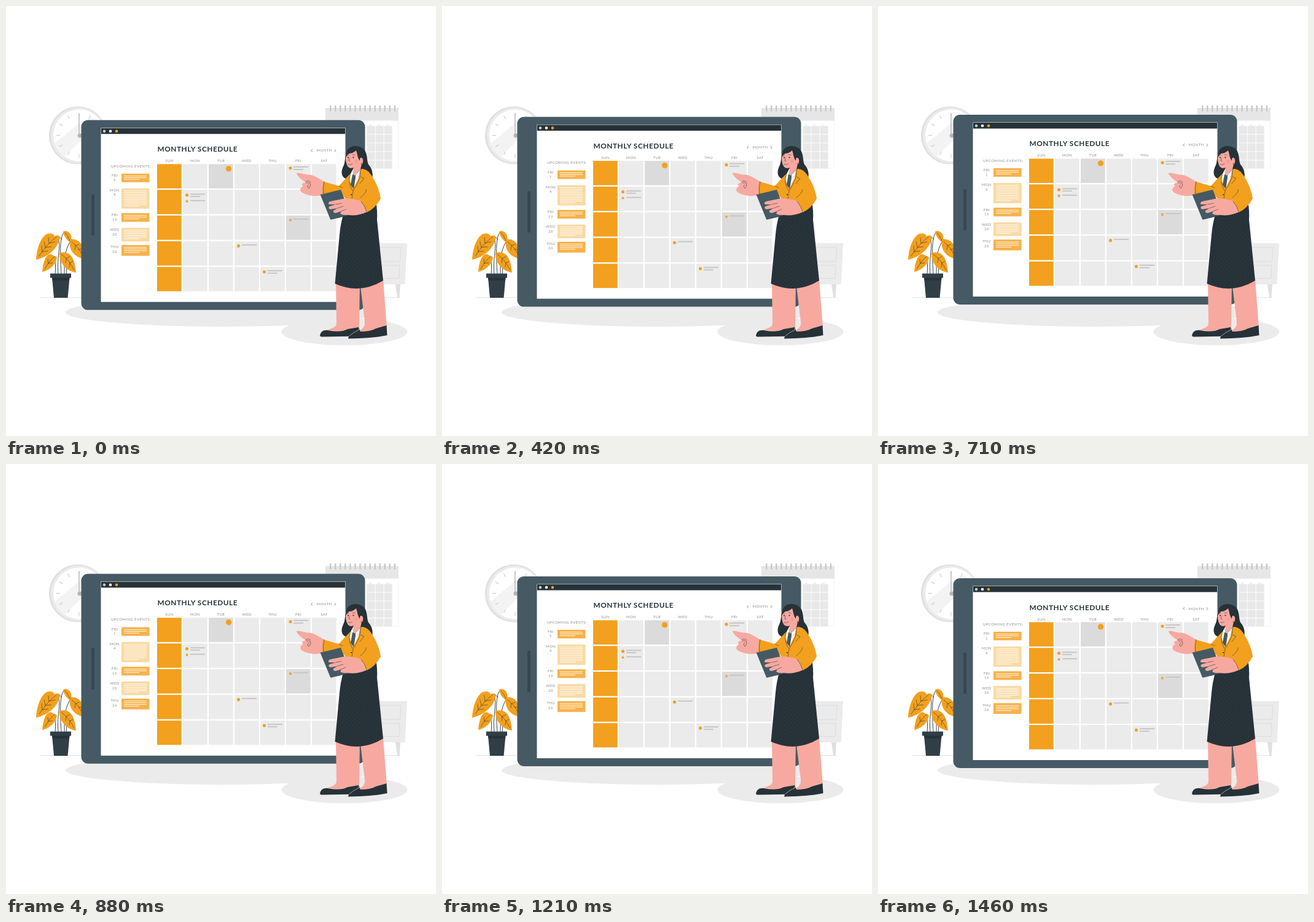
Recreate the animation shown at these times as an HTML page. Size 700x700 px, loop 1500 ms.

```html
<!DOCTYPE html>
<html lang="en">
<head>
<meta charset="utf-8">
<title>Monthly schedule</title>
<style>
  html, body { margin: 0; width: 100%; height: 100%; overflow: hidden; background: #fff; }
  svg { display: block; width: 100vw; height: 100vh; }
  text { font-family: Lato, sans-serif; }
  .title { font-size: 11.8px; font-weight: 700; fill: #263238; letter-spacing: .55px; }
  .label { font-size: 6px; fill: #8c8c8c; letter-spacing: .4px; }
  .ink { fill: none; stroke: #263238; stroke-width: .9; stroke-linecap: round; stroke-linejoin: round; }
  .thin { stroke-width: .55; }
</style>
</head>
<body>
<svg viewBox="0 0 700 700">
  <defs>
    <pattern id="weave" width="7" height="7" patternUnits="userSpaceOnUse">
      <rect width="7" height="7" fill="#263238"/>
      <path d="M1 2h.8M4.500 5.500h.8" stroke="#3f5059" stroke-width=".8"/>
    </pattern>
  </defs>

  <path d="M56 474.700H642" stroke="#e0e0e0"/>
  <ellipse cx="350" cy="498.500" rx="253" ry="23.500" fill="#ebebeb"/>
  <ellipse cx="551" cy="530.300" rx="102.500" ry="22" fill="#ebebeb"/>

  <g id="clock">
    <circle cx="117" cy="210.500" r="47" fill="#e0e0e0"/>
    <circle cx="118" cy="210.500" r="45" fill="#ebebeb"/>
    <circle cx="119" cy="210.500" r="42" fill="#fff"/>
    <path d="M79 224L120 190L140 182L154 188L96 245Q84 237 79 224Z" fill="#f3f3f3"/>
  </g>

  <g id="planner">
    <path d="M520 186H639V264H520Z" fill="#fff" stroke="#f2f2f2" stroke-width=".7"/>
    <path d="M520 166H639V186.500H520Z" fill="#e6e6e6"/>
  </g>

  <path d="M590 386H653L649.500 453H590Z" fill="#ebebeb"/>
  <path d="M600 393H643L641.500 416H600ZM600 422H641L640 443.500H600Z" fill="none" stroke="#dcdcdc"/>
  <path d="M634 453H642L640.500 474H637Z" fill="#e0e0e0"/>

  <g id="plant">
    <path class="ink" d="M80 437Q82 420 78 407M85 437C82 405 92 386 83 377M90 437C88 405 88 386 91 375Q95 364 99 369M95 437C95 418 95 394 106 382M98 437C100 420 98 411 92 403M78 377Q87 373 91 380"/>
    <g fill="#f2a01e">
      <path d="M49 413C50 396 56 376 67 371C73 369 78 371 79 375Q85 371 88 376C86 391 72 408 49 413Z"/>
      <path d="M93 367C97 365 104 367 106 374Q107 380 106 386C100 382 94 376 93 367Z"/>
      <path d="M104 380C117 377 129 389 129 412C114 410 101 400 104 380Z"/>
      <path d="M59 433C60 418 64 406 71 404Q76 404 77 407Q81 406 83 410C81 420 72 430 59 433Z"/>
      <path d="M87 402C94 400 102 401 107 408C112 416 113 425 114 434C100 432 86 420 87 402Z"/>
    </g>
    <path class="ink thin" d="M54 407Q68 386 82 376M59 400L58 391M64 393L62 384M64 393L74 392M70 386L69 377M70 386L80 384M59 400L68 399M96 369Q101 374 104 382M107 384Q118 392 125 407M113 390L119 388M113 390L112 397M118 396L124 396M63 428Q71 414 79 408M69 419L68 412M69 419L76 418M90 404Q103 414 111 430M98 411L104 408M98 411L97 418M104 418L109 416M104 418L103 425"/>
    <path d="M75 442H103.500L100.500 475H78Z" fill="#303e46"/>
    <path d="M75 442H103.500L103 446.500H75.500Z" fill="#263238"/>
    <path d="M72 435.500H106V442.500H72Z" fill="#303e46"/>
  </g>

  <g id="tablet">
    <rect x="122.500" y="186" width="462" height="309" rx="11" fill="#455a64"/>
    <rect x="139" y="307" width="5" height="67" rx="1" fill="#37474f"/>
    <path d="M154.500 198.500H552.500V482H154.500Z" fill="#fff"/>
    <path d="M155 199H552V208.500H155Z" fill="#263238"/>
    <circle cx="160" cy="204" r="2.300" fill="#c7c7c7"/>
    <circle cx="170" cy="204" r="2.300" fill="#fff"/>
    <circle cx="180" cy="204" r="2.300" fill="#f2a01e"/>
    <text class="title" x="246.500" y="237.500">MONTHLY SCHEDULE</text>
    <text class="label" x="171" y="262.700">UPCOMING EVENTS:</text>
    <text class="label" x="505.500" y="237.500">MONTH</text>
    <path d="M498.800 233.300L496.800 235.500L498.800 237.700M534.800 233.300L536.800 235.500L534.800 237.700" fill="none" stroke="#666" stroke-width=".8"/>
  </g>

  <g id="woman">
    <path d="M556 234C551 243 553 254 549 261C545 270 546 277 551 280L566 286L588 288C599 284 599 267 590 258C587 252 589 242 584 235C577 226 562 226 556 234Z" fill="#263238"/>
    <path class="ink thin" d="M589 259Q600 270 595 283"/>

    <g fill="#f7a9a0">
      <path d="M537 450H576L575 524L560 530L522 528C529 525 538 523 538 517Z"/>
      <path d="M576.500 452L614 446L620 523L600 532L570 531C580 527 585 522 584 514Z"/>
    </g>
    <g fill="#263238">
      <path d="M511 537C512 530 517 527 524 528Q546 532 556 526L574 523L577 530L574 537.500L513 538.500Z"/>
      <path d="M557 541C559 534 567 530 576 530Q594 530 602 525L619.500 520L620.500 536C602 540 582 541 557 541.500Z"/>
    </g>
    <path d="M573 525L575 527Q567 530 559 537" fill="none" stroke="#ebebeb" stroke-width=".6"/>
    <path d="M557 322L602 318Q605 333 604 348L614 447Q576 470 535.500 452L543 372Q546 340 557 322Z" fill="url(#weave)"/>

    <path d="M473 273C472 270 483 273 490 274.500C499 274 507 279 518 286L516 307C506 312 488 308 481 303C477 299 480 295 484 293C479 291 483 288 488 287C483 284 476 279 473 273Z" fill="#f7a9a0"/>
    <path class="ink thin" d="M488 286Q493 283 496 287M489 288Q495 287 496 290Q496 294 493 297Q489 293 493 291"/>
    <path d="M516 285.500L542 293C548 286 554 279 562 272L580 265Q588 266 593 273C602 285 608 300 610 313Q600 331 586 336L576 321L556 317L548 308L515 306Z" fill="#f2a01e"/>
    <path d="M562 271L567 262L577 263L574 280L565 298L559 282Z" fill="#fff"/>
    <path d="M564 274L569 275L569 280L566 298L561 291Z" fill="#455a64"/>
    <path d="M566 257H579L577 266Q573 273 567 276Q564 271 566 265Z" fill="#f7a9a0"/>
    <path d="M564 269L567 276L577 265L576 275L570 281" fill="none" stroke="#90a4ae" stroke-width=".6"/>
    <path class="ink thin" d="M577 267Q579 280 565 301L563 314M560 276Q556 287 564 300M577 278L583 281L576 289M518 286Q515 296 517 306M542 293L548 296M587 299Q585 306 577 312"/>
    <circle cx="562" cy="307" r="1" fill="#263238"/>

    <path d="M554 239C552 247 553 257 557 262C561 266 569 263 573 259L577 257Q583 255 582 249Q579 245 576 248L575 234L563 232Z" fill="#f7a9a0"/>
    <path d="M553.500 247C552 235 560 228.500 570 228.500C581 229 587 239 585 250L580 258Q583 249 579 247Q576 246 576 252C572 247 572 240 570 235Q565 240 559 240Q555 242 553.500 247Z" fill="#263238"/>
    <path class="ink thin" d="M555 243.500L558 242.500M564 241.800L568 242.800M559 247L558 252L560 252.500M557 258Q561 259 564 257"/>
    <circle cx="557" cy="246.500" r="1" fill="#263238"/>
    <circle cx="565.500" cy="246.500" r="1.100" fill="#263238"/>
    <circle cx="570" cy="253" r="2.500" fill="#f28f8f" opacity=".6"/>
    <circle cx="580" cy="256" r="1" fill="#f2a01e"/>

    <path d="M512 307L545 299L561 340L528.500 347.500Z" fill="#455a64"/>
    <path class="ink thin" d="M512 307L528.500 347.500L561 340"/>
    <path d="M581 318C570 315 557 312 548 314L528 318Q523 320 526 323L537 323L527 326Q523 329 528 331L540 329L533 333Q532 337 537 337L546 334L544 338Q548 341 556 340C566 342 578 340 588 335Z" fill="#f7a9a0"/>
    <path class="ink thin" d="M537 323L546 321M540 329L549 326M546 334L553 331"/>
    <path d="M578 318L603 299L610 313Q602 329 587 336Q584 325 578 318Z" fill="#f2a01e"/>
    <path class="ink thin" d="M578 318Q585 326 587 335"/>
  </g>
</svg>

<script>
const byId = id => document.getElementById(id);
const tablet = byId('tablet'), clock = byId('clock'), planner = byId('planner');
const orange = '#f2a01e', grey = '#c7c7c7';

function add(parent, tag, attrs, content = '') {
  const node = document.createElementNS('http://www.w3.org/2000/svg', tag);
  for (const key in attrs) node.setAttribute(key, attrs[key]);
  node.textContent = content;
  parent.append(node);
}
const box = (parent, x, y, width, height, fill) => add(parent, 'rect', { x, y, width, height, fill });
const dot = (x, y, r = 2.6) => add(tablet, 'circle', { cx: x, cy: y, r, fill: orange });
const bar = (x, y, width) => box(tablet, x, y - 1, width, 2, grey);
const label = (x, y, content) =>
  add(tablet, 'text', { x, y, class: 'label', 'text-anchor': 'middle' }, content);

function star(x, y) {
  const points = Array.from({ length: 10 }, (_, i) => {
    const r = i % 2 ? 1.4 : 3, a = i * Math.PI / 5;
    return [x + r * Math.sin(a), y - r * Math.cos(a)];
  });
  add(tablet, 'polygon', { points: points.join(' '), fill: orange });
}

// Clock ticks and hands
for (let i = 0; i < 12; i++)
  add(clock, 'path', { d: 'M119 173.500v6', stroke: grey, transform: `rotate(${i * 30} 119 210.500)` });
add(clock, 'path', { d: 'M119 175V211M119 187V211L139 198', fill: 'none', stroke: '#b5b5b5', 'stroke-width': 1.4 });
add(clock, 'circle', { cx: 120, cy: 211, r: 3.5, fill: '#b5b5b5' });

// Wall calendar
for (let x = 527; x < 634; x += 8.05) box(planner, x, 162, 2.4, 9.5, grey);
for (let col = 0; col < 3; col++) {
  box(planner, 591 + col * 14, 193.5, 4, 1, '#e0e0e0');
  for (let row = 0; row < 5; row++)
    box(planner, 587.5 + col * 14, 195.5 + row * 14, 13, 13, '#e8e8e8');
}

// Month grid
['SUN', 'MON', 'TUE', 'WED', 'THU', 'FRI', 'SAT'].forEach((day, col) => {
  const x = 246 + col * 42;
  label(x + 20, 254.5, day);
  for (let row = 0; row < 5; row++) {
    const marked = (col === 2 && row === 0) || (col === 5 && row === 2);
    box(tablet, x, 257.5 + row * 41.85, 39.7, 39.6, col ? (marked ? '#dbdbdb' : '#ebebeb') : orange);
  }
});

dot(362.5, 265, 4.7);
dot(463, 264);     bar(468, 262, 24); bar(468, 266.3, 16);
dot(294.5, 308);   bar(300, 306.5, 24); bar(300, 310.2, 15.5);
star(294.5, 318);  bar(300, 317, 24);
star(463, 348.5);  bar(468, 347, 24);
dot(378.5, 390.7); bar(384, 389, 24);
dot(420.5, 433);   bar(426, 431, 24); bar(426, 435, 15.5);

// Upcoming events: day, date, top, height, line count
[
  ['FRI', 1, 273, 14, 3],
  ['MON', 4, 297, 33, 10],
  ['FRI', 15, 337.3, 14.2, 3],
  ['WED', 20, 361.3, 22.2, 6],
  ['THU', 26, 389.2, 17.6, 4]
].forEach(([day, date, top, height, lines]) => {
  label(177, top + 5.3, day);
  label(177, top + 12.6, date);
  box(tablet, 188, top, 45.5, height, lines > 4 ? '#fad9a3' : '#f6b24a');
  for (let i = 0; i < lines; i++)
    box(tablet, 192, top + 3.5 + i * 2.75, i === lines - 1 ? 25 : 37, 0.9, '#fff');
});

// The tablet floats up and down at constant speed.
const period = 1500, lift = 9.4, topTime = 725;
function draw(now) {
  const t = now % period;
  const away = Math.abs(t - topTime);
  const distance = Math.min(away, period - away);
  const y = 0.2 - lift * (1 - distance / (period / 2));
  tablet.setAttribute('transform', `translate(0 ${y})`);
  requestAnimationFrame(draw);
}
draw(performance.now());
</script>
</body>
</html>
```
